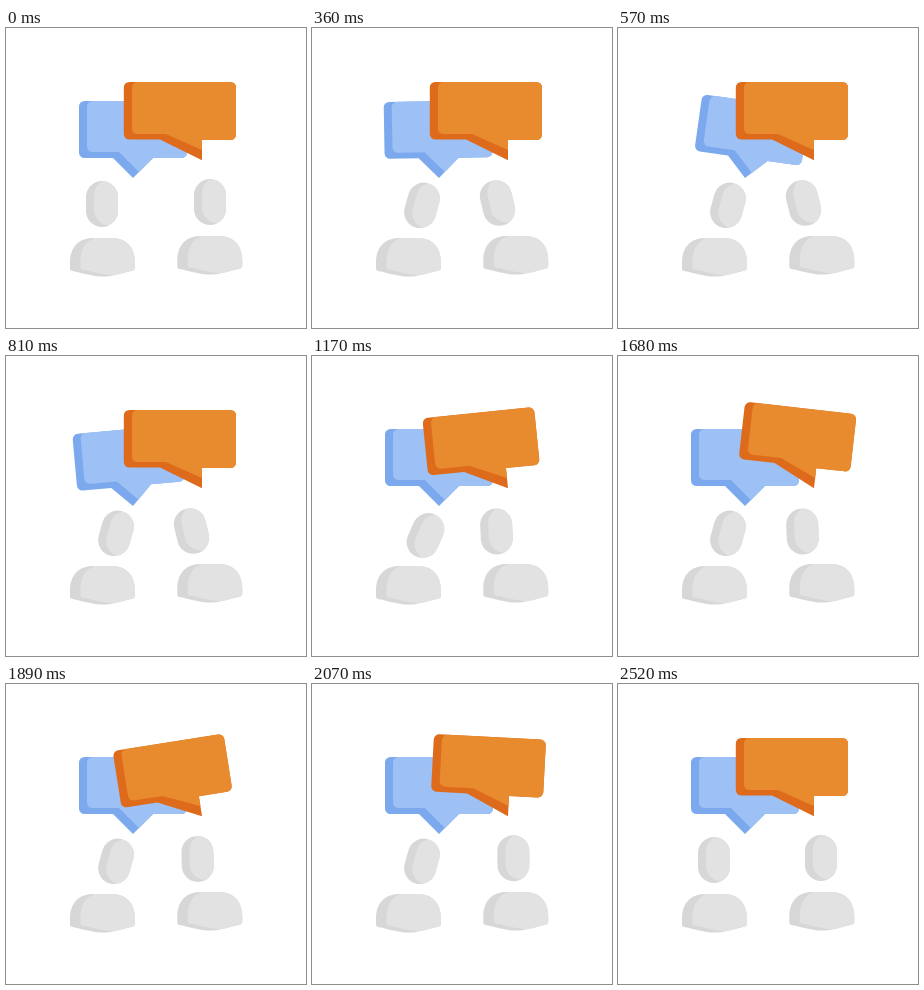
Recreate the animation shown at these times as an HTML page with a canvas. Size 300 by 300 pixels, loop 4.55 s.

```html
<!DOCTYPE html>
<html lang="en">
<head>
<meta charset="utf-8">
<title>Conversation</title>
<style>
html, body { margin: 0; width: 100%; height: 100%; overflow: hidden; background: #fff; }
canvas { display: block; width: 100vw; height: 100vh; }
</style>
</head>
<body>
<canvas id="stage"></canvas>
<script>
const SIZE = 300, LOOP = 4550, STEP = 30, END = 2520;
const canvas = document.getElementById('stage');
const ctx = canvas.getContext('2d');

const GREY = { dark: '#d7d7d7', light: '#e2e2e2' };
const BLUE = { dark: '#7ca9ee', light: '#9dc1f5' };
const ORANGE = { dark: '#de6b1c', light: '#e88b2e' };

const headShape = new Path2D();
headShape.roundRect(-16, -23, 32, 46, 16);
const bodyShape = new Path2D(
  'M64 235 C64 219 73 210 87 210 H106 C120 210 129 219 129 235 V240 ' +
  'Q129 242 127 242.5 C116 245 107 248.6 97 248.6 C86 248.6 77 245 66 243 Q64 242.5 64 241 Z');

// Rounded box whose lower edge breaks into a tail along the given points
function bubblePath(left, top, right, tail) {
  const r = 5.5, path = new Path2D();
  const end = tail[0][1], start = tail[tail.length - 1][1];
  path.moveTo(left + r, top);
  path.arcTo(right, top, right, end, r);
  path.arcTo(right, end, left, end, r);
  tail.forEach(p => path.lineTo(...p));
  path.arcTo(left, start, left, top, r);
  path.arcTo(left, top, right, top, r);
  path.closePath();
  return path;
}

const blue = {
  colors: BLUE, tip: [127, 150],
  back: bubblePath(73, 73, 181, [[147, 130], [127, 150], [107, 130]]),
  face: bubblePath(81, 73, 181, [[147, 130], [133, 144], [113, 124]])
};
const orange = {
  colors: ORANGE, tip: [196, 132],
  back: bubblePath(117.8, 54, 230, [[196, 112], [196, 132.3], [154, 111.6]]),
  face: bubblePath(126, 54, 230, [[196, 112], [196, 122], [160, 106]])
};

// Eased 0 to 1 between two times
function rise(t, from, to) {
  const p = Math.min(Math.max((t - from) / (to - from), 0), 1);
  return (1 - Math.cos(Math.PI * p)) / 2;
}

// Swing in degrees that fades evenly to rest
function swing(t, start, half, length) {
  const u = t - start;
  if (u < 0 || u > length) return 0;
  return -24 * (1 - u / length) * Math.sin(Math.PI * u / half);
}

function fill(shape, color) {
  ctx.fillStyle = color;
  ctx.fill(shape);
}

// Dark shape with a shifted light copy kept inside it
function shaded(shape, x, y, angle, dx, dy) {
  ctx.save();
  ctx.translate(x, y);
  ctx.rotate(angle * Math.PI / 180);
  fill(shape, GREY.dark);
  ctx.clip(shape);
  ctx.translate(dx, dy);
  fill(shape, GREY.light);
  ctx.restore();
}

function head(x, y, angle) {
  shaded(headShape, x, y, angle, 8, -1.5);
}

function body(x, y) {
  shaded(bodyShape, x, y, 0, 10.5, -1.5);
}

function bubble({ colors, tip: [x, y], back, face }, angle) {
  ctx.save();
  ctx.translate(x, y);
  ctx.rotate(angle * Math.PI / 180);
  ctx.translate(-x, -y);
  fill(back, colors.dark);
  fill(face, colors.light);
  ctx.restore();
}

function drawHeads(t) {
  const out = rise(t, 0, 330);
  const left = out - rise(t, 2130, 2520);
  const nod = rise(t, 810, 1170) - rise(t, 1170, 1560);
  head(96 + 14 * left + 3.5 * nod, 176 + 1.3 * left + 2.2 * nod, 15.5 * left + 8.5 * nod);

  const right = out - rise(t, 1690, 2160);
  const upright = rise(t, 810, 1140);
  head(204 - 18.5 * right - upright, 174 + right + 0.5 * upright * right, right * (11 * upright - 13.5));
}

function draw(t) {
  ctx.setTransform(canvas.width / SIZE, 0, 0, canvas.height / SIZE, 0, 0);
  ctx.fillStyle = '#fff';
  ctx.fillRect(0, 0, SIZE, SIZE);
  body(0, 0);
  body(107.3, -2);
  drawHeads(t);
  bubble(blue, swing(t, 98, 267, 950));
  bubble(orange, swing(t, 1147, 290, 1200));
}

function resize() {
  const ratio = window.devicePixelRatio || 1;
  canvas.width = Math.round(innerWidth * ratio);
  canvas.height = Math.round(innerHeight * ratio);
}

let start;
function tick(now) {
  start ??= now;
  const t = (now - start) % LOOP;
  draw(Math.min(Math.floor(t / STEP) * STEP, END));
  requestAnimationFrame(tick);
}

addEventListener('resize', resize);
resize();
draw(0);
requestAnimationFrame(tick);
</script>
</body>
</html>
```
